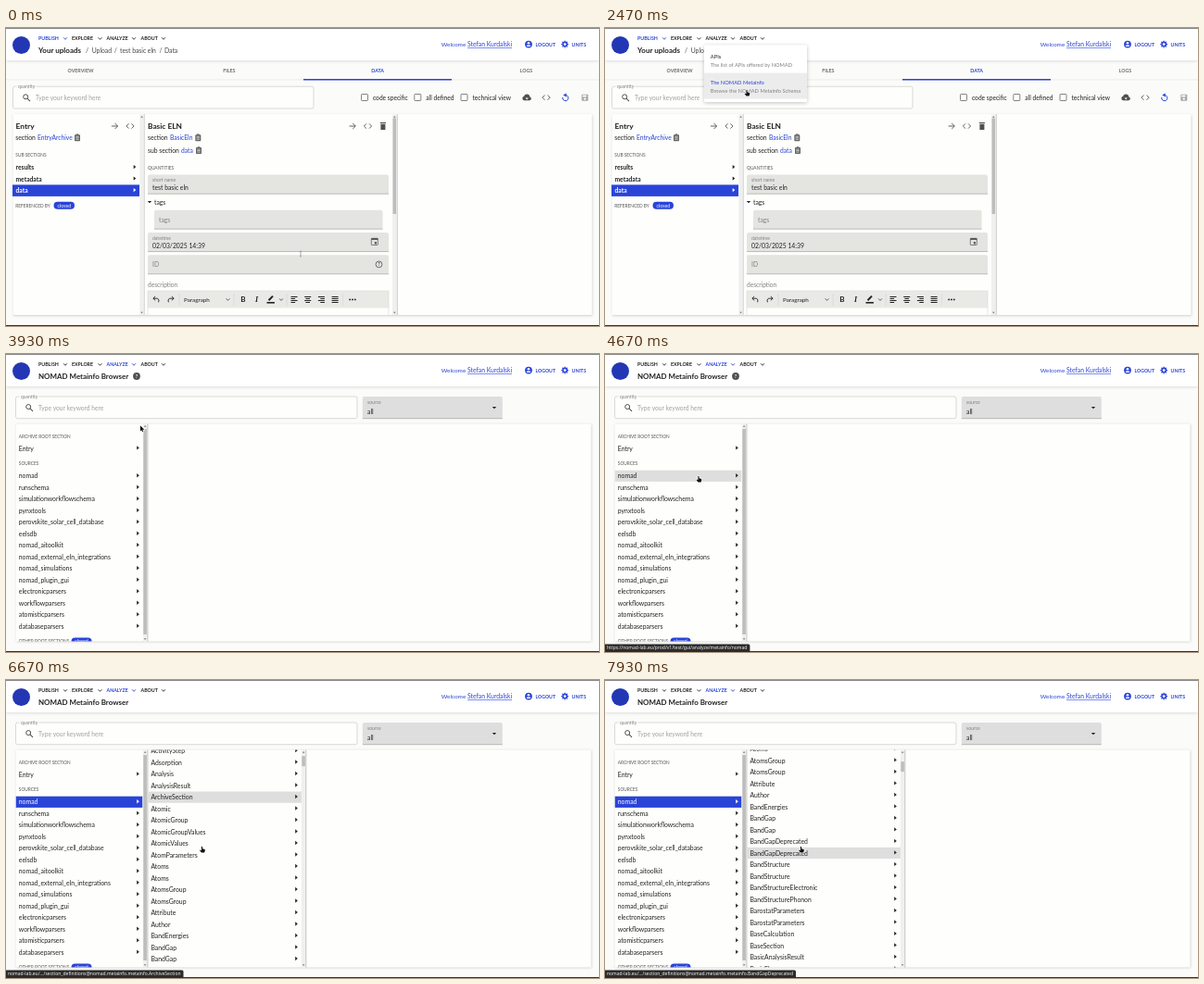
Recreate the animation shown at these times as an HTML page with a canvas. Size 640 by 322 pixels, loop 8 s.

```html
<!DOCTYPE html>
<html lang="en">
<head>
<meta charset="utf-8">
<title>Metainfo browser</title>
<style>
html, body { margin: 0; width: 100%; height: 100%; overflow: hidden; background: #fbfbf9; }
canvas { display: block; width: 640px; height: 322px; }
</style>
</head>
<body>
<canvas id="stage"></canvas>
<script>
const W = 640, H = 322, LOOP = 8000, STEP = 200 / 3;
const BLUE = '#2a44d8', INK = '#222', GREY = '#808080', ICON = '#505050';
const PAGE = '#fbfbf9', PAPER = '#fefefc', FIELD = '#e4e4e1';
const canvas = document.getElementById('stage');
const c = canvas.getContext('2d');
const dpr = window.devicePixelRatio || 1;
canvas.width = W * dpr;
canvas.height = H * dpr;

const SOURCES = ['nomad', 'runschema', 'simulationworkflowschema', 'pynxtools',
  'perovskite_solar_cell_database', 'eelsdb', 'nomad_aitoolkit',
  'nomad_external_eln_integrations', 'nomad_simulations', 'nomad_plugin_gui',
  'electronicparsers', 'workflowparsers', 'atomisticparsers', 'databaseparsers'];
const SECTIONS = ['Activity', 'ActivityResult', 'ActivityStep', 'Adsorption', 'Analysis',
  'AnalysisResult', 'ArchiveSection', 'Atomic', 'AtomicGroup', 'AtomicGroupValues',
  'AtomicValues', 'AtomParameters', 'Atoms', 'Atoms', 'AtomsGroup', 'AtomsGroup',
  'Attribute', 'Author', 'BandEnergies', 'BandGap', 'BandGap', 'BandGapDeprecated',
  'BandGapDeprecated', 'BandStructure', 'BandStructure', 'BandStructureElectronic',
  'BandStructurePhonon', 'BarostatParameters', 'BarostatParameters', 'BaseCalculation',
  'BaseSection', 'BasicAnalysisResult', 'BasicEln'];
const ROW = 12.5;

// Each key: time, values..., optional easing name at the end.
const EASE = {
  both: p => p * p * (3 - 2 * p),
  in: p => p ** 1.3,
  out: p => 1 - (1 - p) ** 1.7
};
const POINTER = [[70, 318, 244], [870, 121, 10], [1470, 121, 10], [2270, 153, 67],
  [3670, 153, 67], [4470, 101, 132], [5670, 101, 132],
  [5930, 135.5, 139, 'in'], [6470, 211.5, 180, 'out']];
const SCROLL = [[6470, 0], [6930, 125], [7200, 125], [7400, 157], [7610, 157], [7870, 190]];
const MENU = [[730, 0], [930, 1], [3330, 1], [3530, 0]];
const RIPPLE = [[2470, 0], [2730, 32], [3070, 32], [3270, 39]];

function track(keys, t, i = 1) {
  if (t <= keys[0][0]) return keys[0][i];
  for (let k = 1; k < keys.length; k++) {
    const a = keys[k - 1], b = keys[k];
    if (t < b[0]) {
      const last = b[b.length - 1];
      const ease = EASE[last] || EASE.both;
      return a[i] + (b[i] - a[i]) * ease((t - a[0]) / (b[0] - a[0]));
    }
  }
  return keys[keys.length - 1][i];
}

function text(s, x, y, size = 6.8, color = INK, style = '', align = 'left', face = 'Lato') {
  c.font = `${style} ${size}px ${face}, sans-serif`;
  c.fillStyle = color;
  c.textAlign = align;
  c.fillText(s, x, y + size * 0.38);
  return c.measureText(s).width;
}
const bold = (s, x, y, size, color, align) => text(s, x, y, size, color, 'bold', align);

function rect(x, y, w, h, color) {
  c.fillStyle = color;
  c.fillRect(x, y, w, h);
}
function round(x, y, w, h, r, fill, stroke) {
  c.beginPath();
  c.roundRect(x, y, w, h, r);
  if (fill) { c.fillStyle = fill; c.fill(); }
  if (stroke) { c.strokeStyle = stroke; c.lineWidth = 0.7; c.stroke(); }
}
function line(pts, color = ICON, w = 0.9) {
  c.beginPath();
  for (let i = 0; i < pts.length; i += 2) c.lineTo(pts[i], pts[i + 1]);
  c.strokeStyle = color;
  c.lineWidth = w;
  c.stroke();
}
function poly(pts, color) {
  c.beginPath();
  for (let i = 0; i < pts.length; i += 2) c.lineTo(pts[i], pts[i + 1]);
  c.fillStyle = color;
  c.fill();
}
function arc(x, y, r, color, w = 0.9, from = 0, to = Math.PI * 2) {
  c.beginPath();
  c.arc(x, y, r, from, to);
  c.strokeStyle = color;
  c.lineWidth = w;
  c.stroke();
}
function disc(x, y, r, color) {
  c.beginPath();
  c.arc(x, y, r, 0, Math.PI * 2);
  c.fillStyle = color;
  c.fill();
}
function clip(x, y, w, h, draw) {
  c.save();
  c.beginPath();
  c.rect(x, y, w, h);
  c.clip();
  draw();
  c.restore();
}
function shadowed(alpha, blur, dy, draw) {
  c.save();
  c.shadowColor = `rgba(0,0,0,${alpha})`;
  c.shadowBlur = blur * dpr;
  c.shadowOffsetY = dy * dpr;
  draw();
  c.restore();
}
const card = (x, y, w, h) => shadowed(0.18, 2.5, 0.5, () => rect(x, y, w, h, PAPER));

// Icons
const chevron = (x, y, color = INK) => line([x - 1.9, y - 1, x, y + 1, x + 1.9, y - 1], color, 0.9);
const caret = (x, y, color = INK) => poly([x - 1.3, y - 2.2, x + 1.3, y, x - 1.3, y + 2.2], color);
const drop = (x, y, color = INK) => poly([x - 2.2, y - 1.1, x + 2.2, y - 1.1, x, y + 1.2], color);
function arrowIcon(x, y) {
  line([x - 3.4, y, x + 3.2, y]);
  line([x + 0.2, y - 3.1, x + 3.3, y, x + 0.2, y + 3.1]);
}
function codeIcon(x, y) {
  line([x - 1.5, y - 2.6, x - 4.1, y, x - 1.5, y + 2.6]);
  line([x + 1.5, y - 2.6, x + 4.1, y, x + 1.5, y + 2.6]);
}
function clipIcon(x, y) {
  round(x - 3, y - 3.2, 6, 7, 0.8, '#666');
  rect(x - 1.2, y - 4, 2.4, 1.4, '#666');
  for (let i = 0; i < 3; i++) line([x - 1.7, y - 1.1 + i * 1.5, x + 1.7, y - 1.1 + i * 1.5], '#fff', 0.6);
}
function searchIcon(x, y) {
  arc(x - 0.8, y - 0.8, 2.5, ICON, 1);
  line([x + 1, y + 1, x + 4, y + 4], ICON, 1.1);
}
function helpIcon(x, y, solid) {
  if (solid) disc(x, y, 3.9, ICON);
  else arc(x, y, 3.4, ICON, 0.8);
  bold('?', x, y, 5.2, solid ? '#fff' : ICON, 'center');
}
function scrollbar(x, top, bottom, from, to) {
  rect(x, top, 4.6, bottom - top, '#f0f0f0');
  poly([x + 1, top + 3.2, x + 3.6, top + 3.2, x + 2.3, top + 1.5], '#777');
  poly([x + 1, bottom - 3.2, x + 3.6, bottom - 3.2, x + 2.3, bottom - 1.5], '#777');
  if (to) rect(x + 0.5, from, 3.6, to - from, '#bdbdbd');
}

function appBar(second, hovered) {
  shadowed(0.2, 4, 0, () => rect(0, 0, W, 35, '#fff'));
  rect(0, 0, W, 1, '#888');
  disc(16.5, 18.5, 9.5, '#2337b4');
  if (hovered) round(105.5, 6, 37, 11, 1.5, '#f0f0f0');
  const active = second ? 'ANALYZE' : 'PUBLISH';
  [['PUBLISH', 35, 64], ['EXPLORE', 71, 101.5], ['ANALYZE', 108.5, 138], ['ABOUT', 145.5, 170]]
    .forEach(([s, x, cx]) => {
      const color = s === active ? BLUE : INK;
      bold(s, x, 11.3, 5.25, color);
      chevron(cx, 11.3, color);
    });
  text('Welcome', 469.7, 17.6, 6.45, BLUE);
  const w = text('Stefan Kurdalski', 498, 17.6, 6.8, BLUE);
  line([498, 21.5, 498 + w, 21.5], BLUE, 0.6);
  disc(564, 17.6, 3.9, BLUE);
  disc(564, 16.2, 1.3, '#fff');
  round(561.8, 18.4, 4.4, 1.7, 0.8, '#fff');
  bold('LOGOUT', 571.5, 17.7, 5.15, BLUE);
  arc(603.2, 17.6, 2.2, BLUE, 1.6);
  for (let i = 0; i < 8; i++) {
    const a = i * Math.PI / 4;
    rect(602.6 + Math.cos(a) * 3.3, 17 + Math.sin(a) * 3.3, 1.2, 1.2, BLUE);
  }
  bold('UNITS', 610.5, 17.7, 5.3, BLUE);
}

function searchBox(x, y, w, h) {
  round(x, y, w, h, 2, PAPER, '#cbcbc9');
  rect(x + 4, y - 1, 21, 2, PAGE);
  text('quantity', x + 5.5, y - 0.3, 5, GREY);
  searchIcon(x + 14.5, y + h / 2);
  text('Type your keyword here', x + 24.5, y + h / 2 + 0.3, 6.65, '#a0a0a0');
}
function field(x, y, w, h, label, value) {
  round(x, y, w, h, [2, 2, 0, 0], FIELD);
  line([x, y + h, x + w, y + h], '#a2a2a0', 0.7);
  if (value) {
    text(label, x + 5, y + 5.8, 5.1, GREY);
    text(value, x + 5, y + h - 6.5, 6.8);
  } else text(label, x + 5, y + h / 2 + 0.3, 6.8, GREY);
}

function editorBar() {
  rect(153, 284, 260, 26, PAPER);
  rect(153, 284, 260, 18.5, '#e9e9e6');
  line([153, 310, 153, 284, 413, 284, 413, 310], '#d8d8d6', 0.6);
  [[162, 1], [178, -1]].forEach(([x, d]) => {
    line([x - d * 0.8, 290, x - d * 3.2, 292.2, x - d * 0.8, 294.4], INK);
    line([x - d * 3, 292.2, x + d * 1.6, 292.2, x + d * 3, 294, x + d * 2.6, 296.3], INK);
  });
  text('Paragraph', 192, 293.3, 6.3);
  chevron(239.5, 293.4, ICON);
  [187, 246, 303, 363.5].forEach(x => line([x, 287, x, 300], '#d6d6d6', 0.6));
  bold('B', 256, 293.3, 8, INK, 'center');
  text('I', 270.5, 293.3, 8, INK, 'italic bold', 'center', 'Liberation Serif');
  line([283.5, 294.2, 288, 289.6], INK, 2);
  rect(281.5, 296, 8.4, 1.6, INK);
  chevron(297, 293.4, ICON);
  [0, 0.5, 1, -1].forEach((side, i) => {
    for (let r = 0; r < 4; r++) {
      const w = side < 0 || r % 2 === 0 ? 7 : 4.6;
      rect(307.5 + i * 14.7 + (7 - w) * Math.max(side, 0), 290 + r * 2, w, 1, INK);
    }
  });
  for (let i = 0; i < 3; i++) disc(371.2 + i * 2.8, 293.4, 0.95, INK);
}

function uploadPage(hoverId) {
  bold('Your uploads', 35, 24.2, 8);
  [['/', 86], ['Upload', 92.7], ['/', 116.8], ['test basic eln', 123], ['/', 165.5], ['Data', 171]]
    .forEach(([s, x]) => text(s, x, 24.2, 6.8, '#444'));

  line([0, 56, W, 56], '#e4e4e2', 0.7);
  ['OVERVIEW', 'FILES', 'DATA', 'LOGS'].forEach((s, i) =>
    bold(s, 80.5 + i * 160.3, 45.5, 5.3, s === 'DATA' ? BLUE : '#6c6c6c', 'center'));
  rect(321, 55, 160, 1.5, BLUE);

  searchBox(7.5, 63.2, 324.5, 23.8);
  [['code specific', 387], ['all defined', 444.3], ['technical view', 494.5]].forEach(([s, x]) => {
    round(x - 3.5, 71.5, 7, 7, 0.8, '#fff', ICON);
    text(s, x + 9, 75.3, 6.65);
  });
  disc(559.6, 76, 2.3, ICON);
  disc(562.2, 74.6, 3, ICON);
  disc(564.8, 76.3, 2, ICON);
  rect(559.6, 75.8, 5.4, 2.5, ICON);
  poly([560.6, 75.6, 563.8, 75.6, 562.2, 77.6], '#fff');
  codeIcon(583, 75.2);
  arc(603.8, 75.6, 3.1, BLUE, 1, -1.2, 3.4);
  poly([601.2, 72.6, 604.8, 70.6, 604.8, 74.6], BLUE);
  round(621.3, 71.7, 7, 7, 0.8, '#a8a8a8');
  rect(622.3, 72.6, 4.2, 1.8, '#fff');
  disc(624.8, 76.6, 1.2, '#fff');

  card(7.5, 93, 625, 217);
  scrollbar(144.3, 93.5, 310);
  line([149.3, 93, 149.3, 310], '#c8c8c8', 0.8);
  bold('Entry', 10.5, 106.3, 8.4);
  arrowIcon(117.3, 106);
  codeIcon(134, 106);
  text('section', 10.3, 118.6, 6.8);
  text('EntryArchive', 34, 118.6, 6.7, BLUE);
  clipIcon(77, 118.4);
  text('SUB SECTIONS', 10.3, 137.4, 4.8, '#555');
  rect(7, 169.4, 137, 12.5, BLUE);
  ['results', 'metadata', 'data'].forEach((s, i) => {
    const y = 150.7 + i * ROW, color = i === 2 ? '#fff' : INK;
    bold(s, 10.5, y, 6.7, color);
    caret(139, y - 0.6, color);
  });
  text('REFERENCED BY', 10.3, 191.8, 4.8, '#555');
  round(51.5, 187.7, 22.5, 8, 4, BLUE);
  text('closed', 62.8, 191.6, 5.2, '#fff', '', 'center');

  clip(149.5, 93, 274, 217, () => {
    bold('Basic ELN', 153, 106.3, 8.3);
    arrowIcon(374, 106);
    codeIcon(390.5, 106);
    rect(404.4, 103.8, 5, 6.2, ICON);
    rect(403.8, 102, 6.2, 1.1, ICON);
    text('section', 153, 118.6, 6.8);
    text('BasicEln', 177, 118.6, 6.7, BLUE);
    clipIcon(207.3, 118.4);
    text('sub section', 153, 132.4, 6.8);
    text('data', 189, 132.4, 6.7, BLUE);
    clipIcon(208, 132.2);
    text('QUANTITIES', 153, 151.4, 4.85, '#555');
    field(153, 158.5, 260, 20.7, 'short name', 'test basic eln');
    drop(155, 188);
    text('tags', 160, 188, 6.8);
    field(160, 196.7, 246.5, 20.5, 'tags');
    field(153, 221, 260, 20.6, 'datetime', '02/03/2025 14:39');
    round(394.3, 227.3, 7, 7.2, 0.6, null, ICON);
    rect(394.3, 227.1, 7, 1.8, ICON);
    rect(397.8, 231.2, 2.2, 2.2, ICON);
    field(153, 245.3, 260, 20.5, 'ID');
    if (hoverId) helpIcon(402.5, 255.4);
    text('description', 153, 277.3, 6.6, GREY);
    editorBar();
  });
  scrollbar(417, 93.5, 310, 97.5, 201);
  line([422.3, 93, 422.3, 310], '#c4c4c4', 0.9);
}

function listRow(s, x, y, caretX, state, rowX, rowW) {
  if (state) rect(rowX, y - 6.1, rowW, 12.2, state === 'on' ? BLUE : '#dedede');
  const color = state === 'on' ? '#fff' : INK;
  text(s, x, y, 6.85, color);
  caret(caretX, y - 0.6, color);
}

function metainfoPage(t, scroll, hover) {
  const open = t >= 5130;
  bold('NOMAD Metainfo Browser', 35, 24.3, 7.95);
  if (!open) helpIcon(141, 24, true);
  searchBox(10.5, 46, 368.5, 23.7);
  round(384.8, 46, 151, 23.7, [2, 2, 0, 0], '#dedede');
  line([384.8, 69.7, 535.8, 69.7], '#a2a2a0', 0.7);
  text('source', 390, 52.4, 5.1, GREY);
  text('all', 390, 62, 6.8);
  drop(527, 58);

  card(10.5, 75.5, 621, 235);
  scrollbar(147.8, 75.5, 310.5, 81, 303);
  line([152.9, 75.5, 152.9, 310.5], '#bcbcbc', 0.9);
  clip(10.5, 75.5, 137, 235, () => {
    text('ARCHIVE ROOT SECTION', 13.8, 88.7, 4.75, '#555');
    listRow('Entry', 13.8, 102, 142.5);
    text('SOURCES', 13.8, 118.4, 4.8, '#555');
    SOURCES.forEach((s, i) => {
      const state = i ? '' : open ? 'on' : t >= 4530 ? 'hover' : '';
      listRow(s, 13.8, 131.8 + i * ROW, 142.5, state, 10.5, 137);
    });
    text('OTHER ROOT SECTIONS', 13.8, 310.3, 4.8, '#555');
    round(70.5, 306.6, 22, 8, 4, BLUE);
    text('closed', 81.5, 310.4, 5.2, '#fff', '', 'center');
  });
  if (!open) return;
  clip(153.4, 75.5, 166, 235, () => {
    text('SECTIONS', 156.4, 88.7 - scroll, 4.8, '#555');
    SECTIONS.forEach((s, i) =>
      listRow(s, 156.4, 102 + i * ROW - scroll, 313.5, i === hover ? 'hover' : '', 153.4, 166));
  });
  const top = 80 + scroll * 0.043;
  scrollbar(318.8, 75.5, 310.5, top, top + 11);
  line([323.8, 75.5, 323.8, 310.5], '#bcbcbc', 0.9);
}

function menu(t, alpha, pointerY) {
  if (alpha <= 0) return;
  const hover = t > 1470 ? (pointerY > 48 ? 1 : pointerY > 20 ? 0 : -1) : -1;
  c.save();
  c.globalAlpha = alpha;
  shadowed(0.24, 4, 1, () => round(107, 18.3, 111, 61.7, 1.5, '#fff'));
  if (hover >= 0) rect(107, 20.7 + hover * 27.9, 111, 27.9, '#ececec');
  const r = track(RIPPLE, t);
  if (r > 0) clip(107, 48.6, 111, 27.9, () => disc(152.3, 65, r, '#c8cfea'));
  [['APIs', 'The list of APIs offered by NOMAD'],
   ['The NOMAD Metainfo', 'Browse the NOMAD Metainfo Schema']].forEach(([a, b], i) => {
    text(a, 113.8, 31 + i * 27.8, 5.75, i === hover ? BLUE : INK);
    text(b, 113.8, 39.7 + i * 27.8, 5.7, GREY);
  });
  c.restore();
}

function statusBar(t, hover) {
  if (t < 4530) return;
  let url = 'https://nomad-lab.eu/prod/v1/test/gui/analyze/metainfo/nomad';
  if (hover >= 0) {
    const name = SECTIONS[hover];
    const root = name.length > 10 ? 'nomad-lab.eu/.../' : 'nomad-lab.eu/prod/v1/test/.../';
    url = root + 'section_definitions@nomad.metainfo.metainfo.' + name;
  }
  c.font = '5px "Noto Sans", sans-serif';
  const w = c.measureText(url).width;
  round(0, 313.4, w + 5, 8.6, [0, 1.5, 0, 0], '#2b2b2b');
  text(url, 2, 317.3, 5, '#f2f2f2', '', 'left', '"Noto Sans"');
}

function pointer(x, y, kind) {
  c.save();
  c.translate(x, y);
  c.lineJoin = 'round';
  if (kind === 'beam') {
    line([-1, -2.8, 1, -2.8], '#777', 0.5);
    line([0, -2.8, 0, 2.8], '#777', 0.6);
    line([-1, 2.8, 1, 2.8], '#777', 0.5);
  } else {
    const shape = kind === 'hand'
      ? [-0.6, 0, 0.5, 0, 0.6, 2.2, 3.2, 2.9, 3.2, 5, 2.5, 6.6, -0.6, 6.6, -2.5, 3.9, -1.8, 3.4, -0.6, 4.2, -0.6, 0]
      : [0, 0, 0, 6.4, 1.5, 5, 2.5, 7.2, 3.4, 6.8, 2.5, 4.7, 4.5, 4.6, 0, 0];
    line(shape, '#fff', 1.4);
    poly(shape, '#111');
  }
  c.restore();
}

function hoveredSection(t, x, y) {
  if (t < 5930 || x < 153.4) return -1;
  // Hover settles only when a scroll has come to rest.
  const rest = t >= 7870 ? 190 : t >= 7400 ? 157 : t >= 6930 ? 125 : 0;
  return Math.floor((y + 1 - 95.75 + rest) / ROW);
}

function draw(now) {
  // The picture advances fifteen times a second.
  const t = Math.round(Math.floor((now % LOOP) / STEP + 0.001) * STEP / 10) * 10;
  const x = track(POINTER, t, 1), y = track(POINTER, t, 2);
  const second = t >= 3070;
  const hover = hoveredSection(t, x, y);
  c.setTransform(dpr, 0, 0, dpr, 0, 0);
  rect(0, 0, W, H, PAGE);
  appBar(second, y < 18);
  if (second) metainfoPage(t, track(SCROLL, t), hover);
  else uploadPage(y > 245 || t < 130);
  menu(t, track(MENU, t), y);
  rect(0, 321, W, 1, '#333');
  statusBar(t, hover);
  let kind = 'hand';
  if (!second && y > 158) kind = 'beam';
  else if (!second && y > 36 && t < 1000) kind = 'arrow';
  else if (t > 3670 && t < 4470 && y < 126) kind = 'arrow';
  pointer(x, y, kind);
}

const start = performance.now();
function tick() {
  draw(performance.now() - start);
  requestAnimationFrame(tick);
}
tick();
</script>
</body>
</html>
```
